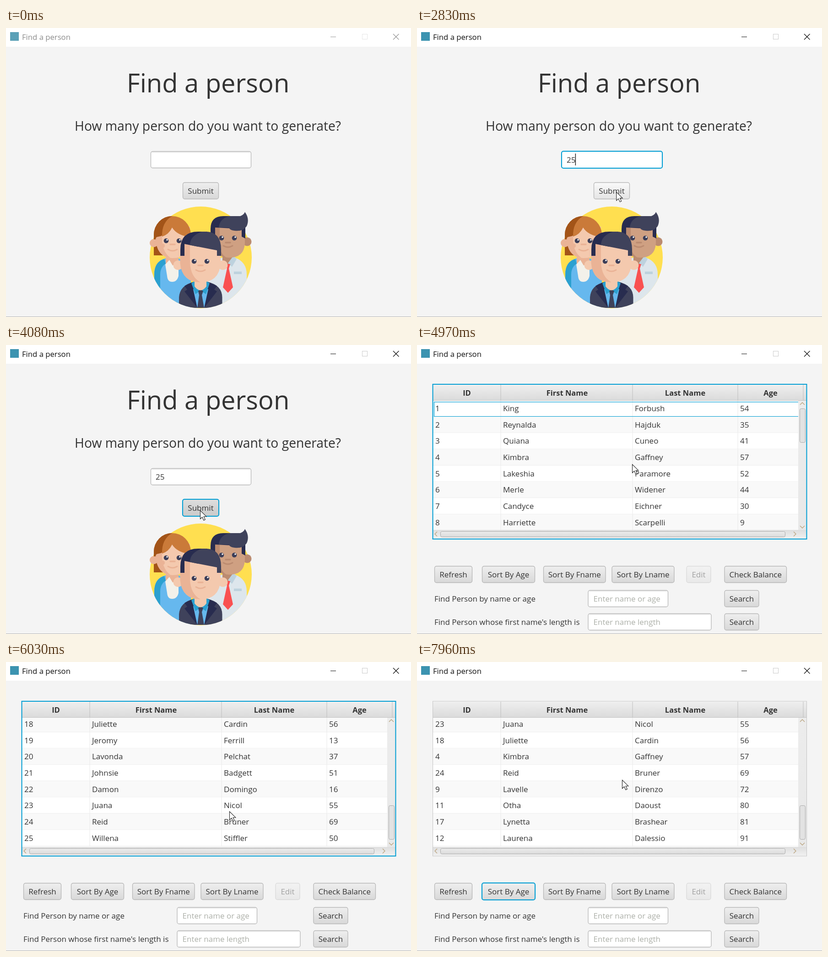
Recreate the animation shown at these times as an HTML page with a canvas. Size 885 by 633 pixels, loop 8 s.

```html
<!DOCTYPE html>
<html lang="en">
<head>
<meta charset="utf-8">
<title>Find a person</title>
<style>
  html, body { margin: 0; width: 100%; height: 100%; overflow: hidden; background: #f4f4f4; }
  canvas { display: block; }
</style>
</head>
<body>
<canvas id="stage" width="885" height="633"></canvas>
<script>
const ctx = document.getElementById('stage').getContext('2d');
const LOOP = 8000, ROW = 35.64, BLUE = '#039ed3', INK = '#333';

// Bursts of screen updates: start, end, number of updates
const bursts = [
  [0, 0, 1], [100, 870, 12], [940, 940, 1], [1140, 1620, 7], [1820, 1960, 3],
  [2290, 3040, 10], [3110, 3900, 12], [3950, 4210, 3], [4410, 5180, 12],
  [5250, 6030, 12], [6100, 6870, 12], [6940, 7360, 7], [7560, 7960, 5]
];
const cursorPath = [
  [100, 783, 608], [700, 357, 250], [870, 366, 280], [940, 367, 288], [1240, 367, 288],
  [1620, 400, 330], [1820, 425, 338], [1960, 439, 345], [2290, 439, 345], [2830, 435, 360],
  [3040, 473, 417], [3400, 490, 491], [3900, 424, 362], [4410, 424, 362], [4970, 470, 261],
  [5390, 484, 287], [6030, 488, 327], [6100, 488, 330], [6800, 74, 547], [6940, 72, 538],
  [7010, 69, 514], [7150, 80, 514], [7290, 225, 540], [7360, 185, 505], [7680, 185, 505],
  [7960, 448, 258]
];
const scrollPath = [[5040, 0], [5390, 366], [5680, 609]];

const people = `King Forbush 54,Reynalda Hajduk 35,Quiana Cuneo 41,Kimbra Gaffney 57,
Lakeshia Paramore 52,Merle Widener 44,Candyce Eichner 30,Harriette Scarpelli 9,
Lavelle Direnzo 72,Corrina Tibbets 24,Otha Daoust 80,Laurena Dalessio 91,
Anjanette Sibrian 27,Alethea Bosse 7,Merlene Sulton 9,Reda Carrigan 8,
Lynetta Brashear 81,Juliette Cardin 56,Jeromy Ferrill 13,Lavonda Pelchat 37,
Johnsie Badgett 51,Damon Domingo 16,Juana Nicol 55,Reid Bruner 69,Willena Stiffler 50`
  .split(',').map((line, i) => [i + 1, ...line.trim().split(' ')]);
const byAge = [...people].sort((a, b) => a[3] - b[3]);

let cursor;

function heldTime(t) {
  const [start, end, count] = bursts.findLast(b => b[0] <= t);
  const step = (end - start) / (count - 1 || 1) || 1;
  return start + Math.min(count - 1, Math.floor((t - start) / step + 0.03)) * step;
}

function along(path, t) {
  const next = path.findIndex(k => k[0] > t);
  if (next === 0) return path[0].slice(1);
  if (next < 0) return path[path.length - 1].slice(1);
  const a = path[next - 1], b = path[next], p = (t - a[0]) / (b[0] - a[0]);
  return a.slice(1).map((v, i) => v + (b[i + 1] - v) * p);
}

function text(str, x, y, size = 17, color = INK, align = 'left', weight = 400) {
  ctx.font = `${weight} ${size}px "Open Sans", "Noto Sans", sans-serif`;
  ctx.fillStyle = color;
  ctx.textAlign = align;
  ctx.fillText(str, x, y);
}

function rect(x, y, w, h, color) {
  ctx.fillStyle = color;
  ctx.fillRect(x, y, w, h);
}

function shade(y, h, top, bottom) {
  const g = ctx.createLinearGradient(0, y, 0, y + h);
  g.addColorStop(0, top);
  g.addColorStop(1, bottom);
  return g;
}

function box(x, y, w, h, fill, border, line = 1, radius = 4) {
  ctx.beginPath();
  ctx.roundRect(x + 0.5, y + 0.5, w - 1, h - 1, radius);
  ctx.fillStyle = fill;
  ctx.fill();
  ctx.lineWidth = line;
  ctx.strokeStyle = border;
  ctx.stroke();
}

function line(points, color, width = 1) {
  ctx.beginPath();
  points.forEach(p => ctx.lineTo(...p));
  ctx.strokeStyle = color;
  ctx.lineWidth = width;
  ctx.stroke();
}

function path(color, d) {
  ctx.fillStyle = color;
  ctx.fill(new Path2D(d));
}

function disc(x, y, r, color) {
  ctx.beginPath();
  ctx.arc(x, y, r, 0, 7);
  ctx.fillStyle = color;
  ctx.fill();
}

function control(x, y, w, h, fill, focus) {
  if (focus) {
    box(x - 1, y - 1, w + 2, h + 2, 'transparent', '#c4e6f2', 2, 5);
    box(x - 0.5, y - 0.5, w + 1, h + 1, fill, BLUE, 2);
  } else {
    box(x, y, w, h, fill, '#b6b6b6', 1.3);
  }
}

function button(label, x, y, w, { focus, pressed, disabled } = {}) {
  const h = 37, [cx, cy] = cursor;
  const hover = cx >= x && cx <= x + w && cy >= y && cy <= y + h;
  const colors = pressed ? ['#dedede', '#cacaca'] : hover && !focus ? ['#fafafa', '#e4e4e4'] : ['#efefef', '#d8d8d8'];
  ctx.globalAlpha = disabled ? 0.4 : 1;
  control(x, y, w, h, shade(y, h, ...colors), focus);
  text(label, x + w / 2, y + 24.5, 17, INK, 'center');
  ctx.globalAlpha = 1;
}

function field(x, y, w, hint, focus) {
  const h = 37;
  control(x, y, w, h, '#fff', focus);
  if (!focus) rect(x + 3, y + 1, w - 6, 3, shade(y + 1, 3, '#ddd', '#fff'));
  text(hint, x + 12, y + 24.5, 17, '#adb0a9');
}

function titleBar(active) {
  const ink = active ? '#111' : '#999';
  rect(0, 0, 885, 41, '#fff');
  rect(9, 9, 19, 19, active ? '#3c93b0' : '#5ba0b6');
  text('Find a person', 35, 26, 16.7, active ? '#111' : '#8c8c8c');
  line([[709, 19.5], [721, 19.5]], ink);
  ctx.strokeStyle = active ? '#ccc' : '#e6e6e6';
  ctx.strokeRect(778.5, 13.5, 11, 11);
  line([[846, 13], [858.5, 25.5]], ink, 1.2);
  line([[858.5, 13], [846, 25.5]], ink, 1.2);
}

function face(x, y, nose, mouth, blush) {
  for (const side of [-14, 14]) {
    disc(x + side, y, 5.3, '#3c3e58');
    disc(x + side + 2, y - 2, 1.8, '#fff');
  }
  ctx.lineCap = 'round';
  line([[x - 5, nose], [x + 5, nose]], blush, 3.5);
  ctx.beginPath();
  ctx.moveTo(x - 10, mouth);
  ctx.quadraticCurveTo(x, mouth + 6, x + 10, mouth);
  ctx.lineWidth = 3;
  ctx.stroke();
  ctx.lineCap = 'butt';
}

function illustration() {
  const skin = '#f4c9ae', tan = '#eab396', navy = '#282c4f', slate = '#3f425b';
  const teal = '#2ba0d0', sky = '#66b8ee', brown = '#cfa082', umber = '#bb8b70';
  disc(425.5, 502.5, 111.5, '#ffdf50');
  ctx.save();
  ctx.beginPath();
  ctx.arc(425.5, 502.5, 111.5, 0, 7);
  ctx.clip();
  path(sky, 'M324 613V540Q324 510 350 504H376Q404 512 404 545V613Z');
  path(teal, 'M324 613V540Q324 512 346 506L349 516Q337 524 337 540V613Z');
  path('#dde6ec', 'M440 613V520Q455 505 473 503H500Q526 512 526 540V613Z');
  ctx.restore();

  // Left figure
  path('#a35418', 'M323 498V453A40 41 0 0 1 363 412V498Z');
  path(tan, 'M349 490H377V518L363 528 349 518Z');
  path('#f3f1ea', 'M348 518L357 508 364 520 377 516V543Q374 556 363 556Q353 556 352 543Z');
  disc(323, 471, 9, tan);
  path(skin, 'M328 450V465Q332 504 364 504Q400 504 402 465V435H345Z');
  path(tan, 'M328 455L341 453Q339 490 360 504Q328 500 327 460Z');
  path('#a35418', 'M323 463V453A40 41 0 0 1 363 412L345 453Q337 457 329 458L326 463Z');
  path('#ca7a39', 'M341 457Q340 425 363 412A41 41 0 0 1 404 453V458Q374 455 363 437Q356 452 341 457Z');
  disc(342, 477, 5, tan);
  face(364, 466, 474, 485, tan);

  // Right figure
  path(umber, 'M473 495H496V515L485 520 473 513Z');
  path('#bdd2de', 'M497 499L504 506 494 523 485 515Z');
  path('#bdd2de', 'M498 533.5H515V539H498Z');
  path('#f95151', 'M479 517H490L487 527 496 568 485 580 474 568 483 527Z');
  disc(527, 468, 9.5, umber);
  path(brown, 'M457 437H517L522 458V472Q520 503 488 503Q457 503 457 470Z');
  path(umber, 'M457 437H467V475Q468 495 482 503Q457 500 457 470Z');
  path(navy, 'M447 470V440Q447 412 475 412H492L487 437 523 436V461L515 457V440L457 437V470Z');
  path(slate, 'M465 437Q467 416 490 412H512Q520 409 522 403Q533 418 526 434Q518 446 500 444Q489 443 487 437Z');
  face(485, 460, 470, 477, umber);

  // Front figure
  ctx.save();
  ctx.beginPath();
  ctx.arc(425.5, 502.5, 111.5, 0, 7);
  ctx.clip();
  path(slate, 'M378 613V590Q380 563 411 556H440Q472 563 472.5 590V613Z');
  path(navy, 'M409 556L390 565 396 573 390 577 418 613H433L461 577 455 573 461 565 441 556 425 590Z');
  path(sky, 'M409 572L418 613H433L442 572 425 574Z');
  path(teal, 'M411 555L425 575 439 555 445 559 437 583 425 575 414 583 405 559Z');
  path(slate, 'M420 576L425 573 431 576 428 585 433 613H418L422 585Z');
  ctx.restore();
  path(skin, 'M412 545H438V566Q425 583 412 566Z');
  disc(376, 519.5, 10.5, skin);
  disc(474, 519.5, 10.5, skin);
  path(skin, 'M388 470L464 484 469 499V515Q466 557 425 557Q385 557 381 515V499Z');
  path(tan, 'M389 470L402 474V515Q404 546 425 557Q384 556 380.5 515V499H389Z');
  path(navy, 'M381 499V485Q381 446 420 446H440L420 479 390 473V499Z');
  path(slate, 'M402 475.5Q402 455 428 446H437Q470 447 470 485V499H461V487Z');
  face(425, 511, 520, 530, tan);
}

function startScreen(t) {
  const focused = t >= 1140 && t < 3950;
  const typed = t < 2290 ? '' : t < 2450 ? '2' : '25';
  text('Find a person', 441.5, 141, 56, INK, 'center');
  text('How many person do you want to generate?', 441, 225, 28.3, INK, 'center');
  field(316, 270, 220, '', focused);
  text(typed, 327, 294.5);
  const blinkStart = t < 2290 ? 1140 : 2450;
  if (focused && Math.floor((t - blinkStart) / 500) % 2 === 0) {
    rect(326 + typed.length * 9.8, 275, 1.5, 26, '#222');
  }
  const pressed = t >= 3950;
  button('Submit', 386, 338, 79, { focus: pressed, pressed });
  illustration();
}

function scrollBars(scroll) {
  const gold = '#b9a27c';
  rect(833, 122, 18, 283, shade(122, 283, '#ececec', '#e8e8e8'));
  box(836, 139 + scroll / 609 * 175, 13, 75, '#e2e2e2', '#aaa', 1, 3);
  line([[837, 131], [842, 126], [847, 131]], gold, 1.3);
  line([[837, 396], [842, 401], [847, 396]], gold, 1.3);
  rect(35, 405, 816, 19, shade(405, 19, '#dedede', '#f0f0f0'));
  box(51, 408, 754, 13, shade(408, 13, '#eee', '#d9d9d9'), '#aaa', 1, 3);
  line([[44, 409], [39, 414], [44, 419]], gold, 1.3);
  line([[823, 409], [828, 414], [823, 419]], gold, 1.3);
}

function table(t) {
  const focused = t < 7560, rows = t < 7650 ? people : byAge;
  const [scroll] = along(scrollPath, t);
  const columns = [183, 471, 701];
  rect(34, 86, 818, 339, '#fff');
  ctx.save();
  ctx.beginPath();
  ctx.rect(35, 122, 798, 283);
  ctx.clip();
  rows.forEach((row, i) => {
    const y = 121.4 + i * ROW - scroll;
    if (y < 80 || y > 405) return;
    rect(35, y, 798, ROW, i % 2 ? '#f9f9f9' : '#fff');
    rect(35, y + ROW - 1, 798, 1, '#ededed');
    columns.forEach(x => rect(x - 0.5, y, 1, ROW, '#e9e9e9'));
    if (i === 0 && focused) {
      ctx.strokeStyle = BLUE;
      ctx.lineWidth = 1.2;
      ctx.strokeRect(37.5, y + 3.5, 800, ROW - 4);
    }
    row.forEach((cell, c) => text(cell, [40, 188, 476, 706][c], y + 23.8));
  });
  ctx.restore();
  rect(35, 87, 816, 35, shade(87, 35, '#efefef', '#dadada'));
  rect(35, 121, 816, 1, '#c4c4c4');
  [...columns, 844].forEach(x => rect(x - 0.5, 87, 1, 35, '#bdbdbd'));
  ['ID', 'First Name', 'Last Name', 'Age'].forEach((label, i) =>
    text(label, [109, 328, 586, 772.5][i], 111, 16.5, INK, 'center', 700));
  scrollBars(scroll);
  ctx.strokeStyle = focused ? BLUE : '#c4c4c4';
  ctx.lineWidth = focused ? 2 : 1;
  ctx.strokeRect(34.5, 86, 817, 339);
}

function tableScreen(t) {
  table(t);
  button('Refresh', 38, 484, 83);
  button('Sort By Age', 142, 484, 116, { focus: t >= 7560, pressed: t >= 7560 && t < 7650 });
  button('Sort By Fname', 276, 484, 136.5);
  button('Sort By Lname', 425.5, 484, 137);
  button('Edit', 588.5, 484, 54, { disabled: true });
  button('Check Balance', 671.5, 484, 136.5);
  text('Find Person by name or age', 38, 561.5);
  field(373.5, 537, 175.5, 'Enter name or age');
  button('Search', 671.5, 537, 76);
  text("Find Person whose first name's length is", 38, 612.5);
  field(373.5, 588, 270, 'Enter name length');
  button('Search', 671.5, 588, 76);
}

function pointer(t) {
  const [x, y] = cursor;
  const overField = t < 4210 && x > 316 && x < 536 && y > 270 && y < 307;
  if (overField) {
    line([[x - 3, y - 9], [x + 4, y - 9]], '#222');
    line([[x + 0.5, y - 9], [x + 0.5, y + 9]], '#222');
    line([[x - 3, y + 9], [x + 4, y + 9]], '#222');
    return;
  }
  ctx.save();
  ctx.translate(x + 0.5, y + 0.5);
  const arrow = new Path2D('M0 0V18.5L4.3 14.5 7.6 21.5 10.8 20 7.6 13.2H13.3Z');
  ctx.fillStyle = '#fff';
  ctx.fill(arrow);
  ctx.strokeStyle = '#222';
  ctx.lineWidth = 1.1;
  ctx.stroke(arrow);
  ctx.restore();
}

function draw(now) {
  const t = heldTime(now % LOOP);
  cursor = t < 100 ? [-50, -50] : along(cursorPath, t);
  rect(0, 0, 885, 633, '#f4f4f4');
  titleBar(t >= 1140);
  (t < 4209 ? startScreen : tableScreen)(t);
  rect(0, 632, 885, 1, '#b4b4b4');
  pointer(t);
  requestAnimationFrame(draw);
}
requestAnimationFrame(draw);
</script>
</body>
</html>
```
